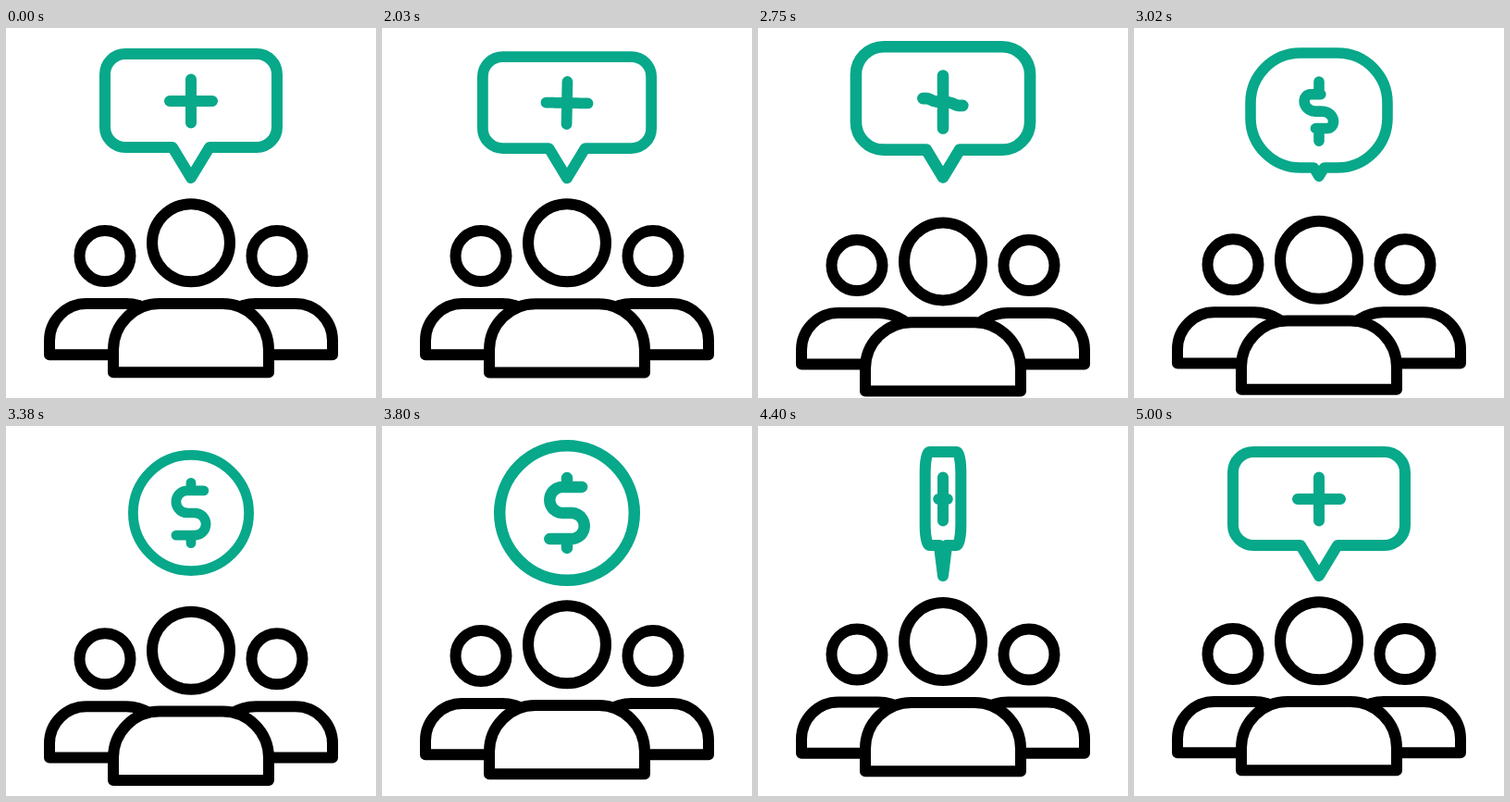
Write an HTML page with a canvas that moves like this. It is 400x400 px and loops after 5.03 s.

```html
<!DOCTYPE html>
<html lang="en">
<head>
<meta charset="utf-8">
<title>Team value</title>
<style>
  html, body { margin: 0; width: 100%; height: 100%; overflow: hidden; background: #fff; }
  canvas { display: block; width: 400px; height: 400px; }
</style>
</head>
<body>
<canvas id="stage" width="400" height="400"></canvas>
<script>
const ctx = document.getElementById('stage').getContext('2d');
const LOOP = 5030, START = 2000, STEP = 30;
const GREEN = '#08a88a', BLACK = '#000', LINE = 12;
const FLIP = 4060, FLIP_TIME = 600;
const ANCHOR = 180, COIN_Y = 94, COIN_R = 70;

// Key times and values, joined by smooth curves without overshoot
const push = [[2000, 0], [2330, 10], [2540, 20], [2630, 21], [2750, 20.2], [3080, 18],
  [3380, 10.6], [3650, 6], [3800, 4], [4190, 1.8], [4400, 0.9], [5000, 0]];
const bubbleSize = [[2000, 1], [2030, 0.98], [2240, 0.6], [2570, 1.065], [2750, 1.055], [3300, 1]];
const coinSize = [[2750, 70], [3300, 61.6], [3380, 62.6], [3700, 73.6], [3800, 72.8], [4160, 70]];

const lerp = (a, b, k) => a + (b - a) * k;
const clamp = k => Math.min(1, Math.max(0, k));
const smooth = (t, from, to) => {
  const k = clamp((t - from) / (to - from));
  return k * k * (3 - 2 * k);
};

function curve(keys, t) {
  const last = keys.length - 1;
  if (t <= keys[0][0]) return keys[0][1];
  if (t >= keys[last][0]) return keys[last][1];
  const slope = i => (keys[i + 1][1] - keys[i][1]) / (keys[i + 1][0] - keys[i][0]);
  const tangent = i => {
    if (i === 0 || i === last) return 0;
    const a = slope(i - 1), b = slope(i);
    return a * b <= 0 ? 0 : 2 * a * b / (a + b);
  };
  let i = 0;
  while (t > keys[i + 1][0]) i++;
  const h = keys[i + 1][0] - keys[i][0], k = (t - keys[i][0]) / h;
  const k2 = k * k, k3 = k2 * k;
  return keys[i][1] * (2 * k3 - 3 * k2 + 1) + keys[i + 1][1] * (3 * k2 - 2 * k3) +
    h * (tangent(i) * (k3 - 2 * k2 + k) + tangent(i + 1) * (k3 - k2));
}

// Point on the dollar's S at distance share u, centred on 0,0
function sPoint(u) {
  const r = 13.5, arc = Math.PI * r;
  let d = u * (20 + arc + 9 + arc + 22.5);
  if (d < 20) return [15.5 - d, -27];
  d -= 20;
  if (d < arc) return [-4.5 - r * Math.sin(d / r), -r - r * Math.cos(d / r)];
  d -= arc;
  if (d < 9) return [-4.5 + d, 0];
  d -= 9;
  if (d < arc) return [4.5 + r * Math.sin(d / r), r - r * Math.cos(d / r)];
  return [4.5 - (d - arc), 27];
}

function outline(path, color, fill) {
  ctx.beginPath();
  ctx.save();
  path();
  ctx.restore();
  if (fill) {
    ctx.fillStyle = fill;
    ctx.fill();
  }
  ctx.strokeStyle = color;
  ctx.stroke();
}

// Height of a bubble part when the bubble grows from its anchor
const grown = (y, size) => lerp(ANCHOR, y, size);

// m = 0 is the speech bubble, m = 1 the round coin
function drawFrame(m, size, radius, sx) {
  const half = lerp(93 * size, radius, m);
  const top = lerp(grown(28, size), COIN_Y - radius, m);
  const bottom = lerp(grown(129, size), COIN_Y + radius, m);
  const tip = lerp(grown(162, size), COIN_Y + radius, m);
  const tail = lerp(20 * size, 0, m);
  const r = Math.min(lerp(22 * size, radius, m), half, (bottom - top) / 2);
  outline(() => {
    ctx.translate(200, 0);
    ctx.scale(sx, 1);
    ctx.moveTo(0, top);
    ctx.arcTo(half, top, half, bottom, r);
    ctx.arcTo(half, bottom, 0, bottom, r);
    ctx.lineTo(tail, bottom);
    ctx.lineTo(0, tip);
    ctx.lineTo(-tail, bottom);
    ctx.arcTo(-half, bottom, -half, top, r);
    ctx.arcTo(-half, top, 0, top, r);
    ctx.closePath();
  }, GREEN);
}

function drawSign(m, stretch, size, radius, sx, turn) {
  const coin = radius / COIN_R;
  const y = lerp(grown(79, size), COIN_Y, stretch);
  const stem = lerp(23.5 * size, 36.5 * coin, stretch);
  const gap = 27 * coin * m;
  outline(() => {
    ctx.translate(200, y);
    ctx.scale(sx, 1);
    ctx.rotate(turn);
    for (const side of [-1, 1]) {
      ctx.moveTo(0, side * stem);
      ctx.lineTo(0, side * gap);
    }
    const n = 60;
    for (let i = 0; i <= n; i++) {
      const u = i / n, [px, py] = sPoint(u);
      const x = lerp((2 * u - 1) * stem * 0.98, px * coin, m);
      ctx[i ? 'lineTo' : 'moveTo'](x, py * coin * m);
    }
  }, GREEN);
}

function drawSidePerson(dir, dy) {
  const place = () => {
    ctx.translate(200, dy);
    ctx.scale(dir, 1);
  };
  outline(() => {
    place();
    ctx.arc(93, 246.5, 27.5, 0, Math.PI * 2);
  }, BLACK);
  outline(() => {
    place();
    ctx.moveTo(84, 353.3);
    ctx.lineTo(153, 353.3);
    ctx.lineTo(153, 338);
    ctx.arcTo(153, 298, 113, 298, 40);
    ctx.lineTo(70, 298);
    ctx.quadraticCurveTo(56, 298, 43, 306);
  }, BLACK);
}

function drawLeader(dy) {
  outline(() => {
    ctx.translate(0, dy);
    ctx.moveTo(116, 372.3);
    ctx.lineTo(116, 348);
    ctx.arcTo(116, 298, 166, 298, 50);
    ctx.arcTo(284, 298, 284, 348, 50);
    ctx.lineTo(284, 372.3);
    ctx.closePath();
  }, BLACK, '#fff');
  outline(() => ctx.arc(200, 232.2 + dy, 42, 0, Math.PI * 2), BLACK);
}

function draw(t) {
  ctx.fillStyle = '#fff';
  ctx.fillRect(0, 0, 400, 400);
  ctx.lineWidth = LINE;
  ctx.lineCap = ctx.lineJoin = 'round';

  const dy = curve(push, t);
  drawSidePerson(-1, dy / 2);
  drawSidePerson(1, dy / 2);
  drawLeader(dy);

  const flip = clamp((t - FLIP) / FLIP_TIME);
  const sx = Math.max(0.01, Math.abs(Math.cos(Math.PI * flip)));
  const back = flip > 0.5;
  const size = back ? 1 : curve(bubbleSize, t);
  const radius = curve(coinSize, t);
  const m = back ? 0 : smooth(t, 2595, 3245);
  const stretch = back ? 0 : smooth(t, 2430, 3280);
  const spin = clamp((t - START) / 600);
  const turn = -Math.PI / 2 * (1 + Math.cos(Math.PI * spin));
  ctx.lineWidth = LINE * lerp(size, radius / COIN_R, m);
  drawFrame(m, size, radius, sx);
  drawSign(m, stretch, size, radius, sx, turn);
}

const origin = performance.now();
function tick() {
  const t = (performance.now() - origin) % LOOP;
  draw(t < START + STEP ? 0 : START + Math.floor((t - START) / STEP) * STEP);
  requestAnimationFrame(tick);
}
tick();
</script>
</body>
</html>
```
